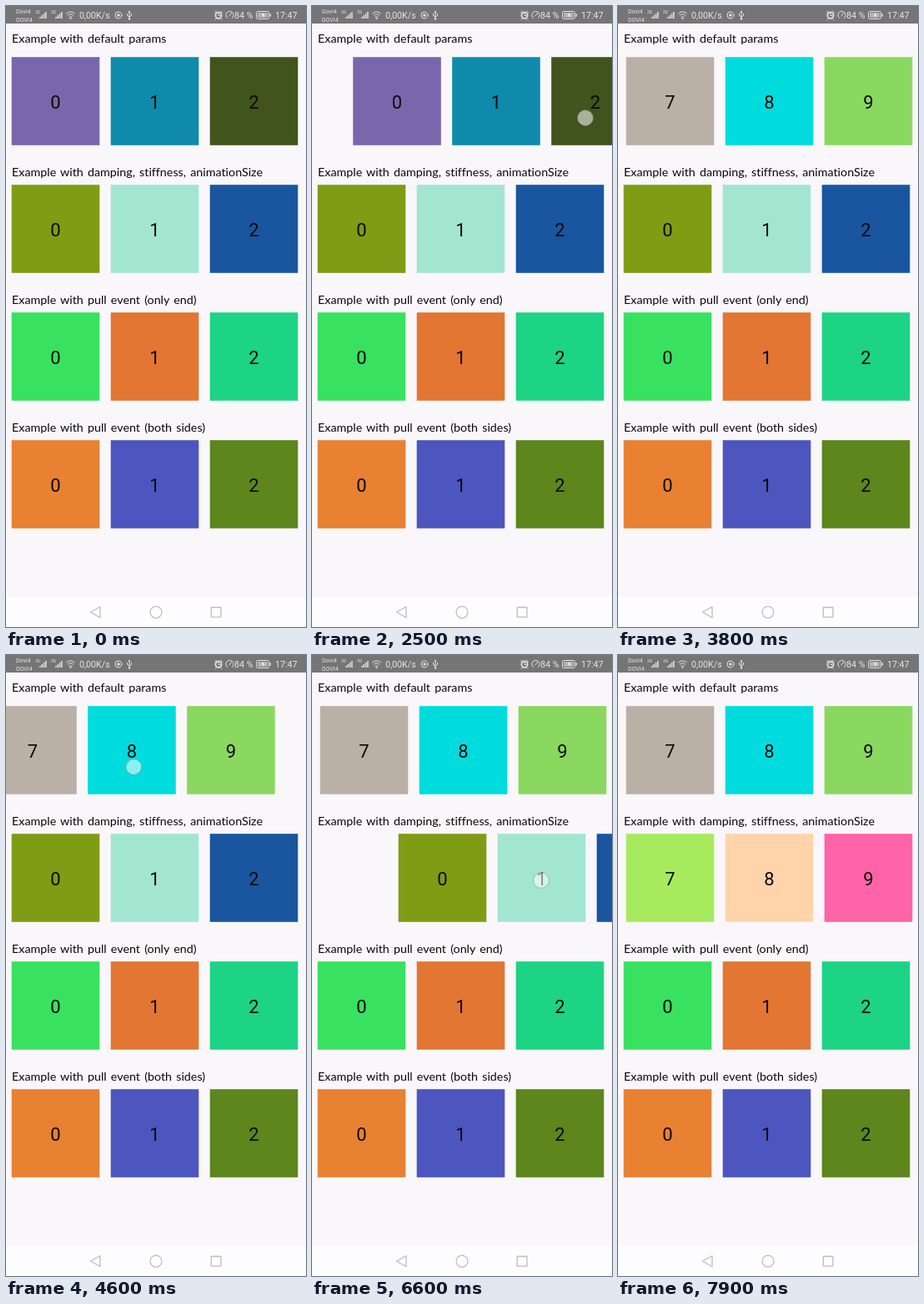
Recreate the animation shown at these times as an HTML page. Size 360 by 744 pixels, loop 8 s.

```html
<!DOCTYPE html>
<html lang="en">
<head>
<meta charset="utf-8">
<title>Elastic lists</title>
<style>
  html, body { margin: 0; width: 100%; height: 100%; overflow: hidden; background: #f9f7fa; }
  svg { display: block; width: 100vw; height: 100vh; }
  .label { font: 14.3px Lato, sans-serif; word-spacing: 1.5px; font-variant-ligatures: none; fill: #080808; }
  .digit { font: 22px Roboto, sans-serif; fill: #0a0a0a; text-anchor: middle; }
  .bar text { font-family: Roboto, sans-serif; fill: #e6e6e6; }
  .line { fill: none; stroke: #e2e2e2; stroke-width: 1; stroke-linecap: round; }
  .nav { fill: none; stroke: #bdbcbf; stroke-width: 1.3; stroke-linejoin: round; }
</style>
</head>
<body>
<svg viewBox="0 0 360 744">
  <rect width="360" height="744" fill="#f9f7fa"/>
  <g id="rows"></g>
  <circle id="touch" r="9.3" fill="#fff" fill-opacity=".55" stroke="#8f8f8f" stroke-opacity=".6"/>

  <g class="bar">
    <rect width="360" height="21" fill="#757575"/>
    <text x="12" y="9" font-size="7">Dovi4</text>
    <text x="12" y="18.5" font-size="7">DOVI4</text>
    <g id="signal">
      <text x="35" y="9" font-size="5">3G</text>
      <path d="M41 15v-2M43.3 15v-4M45.6 15v-6M47.9 15v-8" stroke="#e2e2e2" stroke-width="1.5"/>
    </g>
    <use href="#signal" x="19"/>
    <path class="line" d="M72.5 9q5-4.5 10 0M74.2 11.2q3.3-3 6.6 0M75.8 13.3q1.7-1.5 3.4 0"/>
    <circle cx="77.5" cy="15" r="1" fill="#e2e2e2"/>
    <text x="88" y="15" font-size="10.7">0,00K/s</text>
    <circle class="line" cx="135" cy="11" r="4"/>
    <circle cx="135" cy="11" r="1.8" fill="#e2e2e2"/>
    <path class="line" d="M148 7v8M145.5 9.5v2l2.5 1.5 2.5-1.5v-2"/>
    <path d="M146.5 8l1.5-2.5 1.5 2.5z" fill="#e2e2e2"/>
    <circle cx="148" cy="15.5" r="1.2" fill="#e2e2e2"/>
    <circle class="line" cx="255" cy="11.3" r="3.6" style="stroke-width:1.8"/>
    <path class="line" d="M255 9v2.5h2M250.5 8l2-2M259.5 8l-2-2M252 15.5l-1 1M258 15.5l1 1"/>
    <path class="line" d="M265.5 14.5a4.6 4.6 0 1 1 6 0M268 12l2.5-3.5"/>
    <text x="274" y="15" font-size="10.7">84 %</text>
    <rect class="line" x="300.5" y="6.5" width="15" height="9" rx="2"/>
    <rect x="302" y="8" width="12" height="6" rx="1" fill="#b4b4b4"/>
    <path d="M317.3 9.3v3.4" stroke="#e2e2e2" stroke-width="1.4"/>
    <path d="M309 8l-2.2 3.3h2l-.6 2.7 2.5-3.5h-2z" fill="#fff"/>
    <text x="323" y="15" font-size="10.7">17:47</text>
  </g>

  <rect y="708" width="360" height="36" fill="#fdfcfe"/>
  <path class="nav" d="M101.5 726.3L113 719.8v13z"/>
  <circle class="nav" cx="180" cy="726.3" r="7"/>
  <rect class="nav" x="246.3" y="720.5" width="11.6" height="11.6"/>
</svg>
<script>
const NS = "http://www.w3.org/2000/svg";
const LOOP = 8000, STEP = 100;
const SIZE = 105.6, PITCH = 119, LEFT = 6.7, TOP = 61.2, ROW = 153;
const END = -830, REACH = 120, STIFF = 0.019;

const lists = [
  ["Example with default params",
    "7a67ab 0f8aab 40541c 9e0f22 d65200 dc3064 5a78b8 bbb0a5 00dcdd 8ad85f"],
  ["Example with damping, stiffness, animationSize",
    "7f9c15 a2e6d0 1a569f c4743c 7a58a8 3fa5a0 d8c048 a8ea5e ffd4ab ff63a8"],
  ["Example with pull event (only end)", "38e160 e27632 1cd483"],
  ["Example with pull event (both sides)", "e88132 4d55be 5d861c"]
];

// down and up: finger times; x, y: where it lifts; stop: end of a fling
const gestures = [
  { row: 0, down: 1800, up: 2500, by: 42.5, x: 328, y: 134 },
  { row: 0, down: 3294, up: 3400, by: END, x: 214, y: 133, stop: 3800 },
  { row: 0, down: 4300, up: 5100, by: -55, x: 100, y: 134 },
  { row: 1, down: 6400, up: 6700, by: 112, x: 291, y: 270 },
  { row: 1, down: 7550, up: 7700, by: END, x: 200, y: 270, stop: 7900 }
];

const clamp = v => Math.min(1, Math.max(0, v));
const dragEase = (g, t) => Math.sin(clamp((t - g.down) / (g.up - g.down)) * Math.PI / 2);

function shift(g, t) {
  if (g.stop) {
    const u = clamp((t - g.down) / (g.stop - g.down));
    return g.by * (1 - (1 - u) ** 1.7);
  }
  // a pull springs back, critically damped
  const k = STIFF * Math.max(0, t - g.up);
  return g.by * dragEase(g, t) * (1 + k) * Math.exp(-k);
}

function add(parent, tag, attrs, text) {
  const el = document.createElementNS(NS, tag);
  for (const k in attrs) el.setAttribute(k, attrs[k]);
  if (text !== undefined) el.textContent = text;
  return parent.appendChild(el);
}

const root = document.getElementById("rows");
const touch = document.getElementById("touch");
const tracks = lists.map(([title, colors], row) => {
  const y = TOP + row * ROW;
  add(root, "text", { class: "label", x: 7, y: row ? y - 10.4 : 44 }, title);
  const track = add(root, "g", {});
  colors.split(" ").forEach((c, i) => {
    const x = LEFT + i * PITCH;
    add(track, "rect", { x, y, width: SIZE, height: SIZE, fill: "#" + c });
    add(track, "text", { class: "digit", x: x + SIZE / 2, y: y + 61.7 }, i);
  });
  return track;
});

function draw(ms) {
  const t = Math.floor(ms % LOOP / STEP) * STEP;
  tracks.forEach((track, row) => {
    const x = gestures.reduce((sum, g) => g.row === row ? sum + shift(g, t) : sum, 0);
    track.setAttribute("transform", `translate(${x.toFixed(2)} 0)`);
  });
  const g = gestures.find(g => t > g.down && t <= g.up);
  touch.style.display = g ? "" : "none";
  if (g) {
    touch.setAttribute("cx", g.x - Math.sign(g.by) * REACH * (1 - dragEase(g, t)));
    touch.setAttribute("cy", g.y);
  }
}

let start;
function tick(now) {
  if (start === undefined) start = now;
  draw(Math.max(0, now - start));
  requestAnimationFrame(tick);
}
draw(0);
requestAnimationFrame(tick);
</script>
</body>
</html>
```
